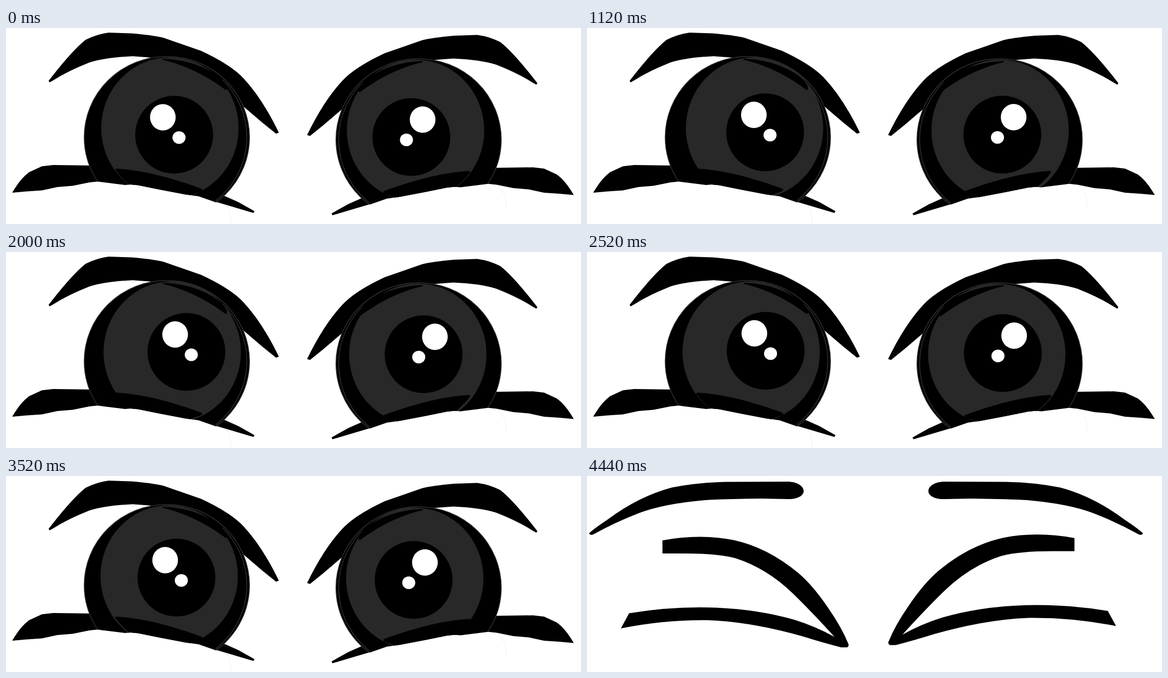
Animation, 1120 px wide and 382 px high, one loop 4640 ms. Source, as an HTML page:

```html
<!DOCTYPE html>
<html lang="en">
<head>
<meta charset="utf-8">
<title>Blinking eyes</title>
<style>
  html, body { margin: 0; width: 100%; height: 100%; overflow: hidden; background: #fff; }
  svg { display: block; width: 100%; height: 100%; }
  .line { fill: none; stroke: #303030; stroke-width: 1.5; }
  .faint { fill: none; stroke: #f0f0f0; }
</style>
</head>
<body>
<svg viewBox="0 0 1120 382">
  <defs>
    <clipPath id="aboveLowerLid">
      <path d="M100 0H520V360L408 339.500L375 328L350 324.500L300 315L258 306.500L243 305L232 306L180 299.500L150 290H100Z"/>
    </clipPath>
    <g id="lids">
      <path d="M83 103L90 94Q130 43 155 23Q177 12 200 9L245 10.500Q290 14.500 308 19.500L380 44.500Q439 72 463 98.500Q499 137 531.500 204L526 206L500 185L459 150L400 90L310 62L280 57.500L247 55Q195 57 163 67Q120 84 92 102L85 106Z"/>
      <path d="M12 321L17 313Q30 292 45 281L70 269.500L92 267L163 268L181 299L162 301L130 307.500L100 310L70 316.500L40 318.500Z"/>
      <path d="M406 338L425 327L452 339L484 357L482 360.500Q440 348 406 338Z"/>
    </g>
    <g id="ball">
      <ellipse cx="313.300" cy="213" rx="161" ry="157.500"/>
      <ellipse class="line" cx="313.300" cy="213" rx="161" ry="157.500"/>
      <path class="line" d="M422 101A157.500 157 0 0 1 408 337"/>
    </g>
    <ellipse id="iris" cx="319.300" cy="195" rx="133.800" ry="138" fill="#282828"/>
    <g id="shadows">
      <path d="M305 62C345 71 390 92 428 121Q431 120 430 117C434 103 380 61 305 60Z"/>
      <path d="M214 274C250 276 300 284 380 313Q385 316 378 319L358 326L300 320L241 306Q224 292 213 277Z"/>
    </g>
    <g id="pupil">
      <circle cx="327.500" cy="208" r="75.800"/>
      <ellipse cx="305.500" cy="174" rx="25" ry="25.700" fill="#fff"/>
      <ellipse cx="337" cy="213.500" rx="12.700" ry="12.300" fill="#fff"/>
    </g>
    <path id="brow" d="M4 112Q10 105 40 85Q100 40 165 22.500Q215 12.500 270 11.500L390 11C410 11 422 20 422 29.500C422 38 410 46 390 45L340 44Q270 44.500 230 47Q150 54 102 72Q55 90 12 114Q6 116 4 112Z"/>
    <path id="shut" d="M147 125.500V151H190Q255 151 290 160.500Q350 180 400 228Q440 267 482 313.500Q445 293 405 280.500Q320 256 220 256Q150 256 82 267.500L66 297Q150 280 235 281Q320 284 420 312.500Q460 325 495 334H507Q511 331 509 327Q496 295 471 259Q441 214 411 188.500Q351 139 286 125Q220 112 147 125.500Z"/>
  </defs>

  <g id="open">
    <path class="faint" d="M428 342Q440 358 438 380M958 309Q978 325 973 352"/>
    <use href="#lids"/>
    <use href="#lids" transform="matrix(-1 0 0 1 1118 4.500)"/>
    <g class="eye"></g>
    <g class="eye" transform="matrix(-1 0 0 1 1117 4.500)"></g>
  </g>
  <g id="closed">
    <use href="#brow"/>
    <use href="#brow" transform="matrix(-1 0 0 1 1087 0)"/>
    <use href="#shut"/>
    <use href="#shut" transform="matrix(-1 0 0 1 1096.500 -4.500)"/>
  </g>
</svg>
<script>
  const LOOP = 4640, STEP = 40, REST = 4160, BLINK = 4440;

  // Gaze offsets in pixels at key times in ms.
  const times  = [0, 680, 1120, 1560, 2040, 2520, 3080, 3520, 3960, 4160];
  const irisX  = [0, 5.5, 7, 6.6, 4.2, 0.5, -2, -1.5, -0.1, 0];
  const pupilX = [0, 13, 19.5, 23.5, 23.8, 20.5, 12, 4.5, 0.3, 0];
  const pupilY = [0, 0, -4.7, -10, -13.5, -15.5, -15, -10, -1.6, 0];

  const slope = (v, i) => i === 0 || i === v.length - 1
    ? 0 : (v[i + 1] - v[i - 1]) / (times[i + 1] - times[i - 1]);

  // Smooth cubic through the keys, at rest at both ends.
  function sample(v, t) {
    let i = 0;
    while (i < times.length - 2 && t >= times[i + 1]) i++;
    const span = times[i + 1] - times[i], u = (t - times[i]) / span, w = 1 - u;
    return v[i] * w * w * (1 + 2 * u) + v[i + 1] * u * u * (3 - 2 * u)
      + span * u * w * (slope(v, i) * w - slope(v, i + 1) * u);
  }

  const eyes = [...document.querySelectorAll('.eye')].map((eye, i) => {
    eye.innerHTML = `<g clip-path="url(#aboveLowerLid)"><use href="#ball"/>
      <use class="iris" href="#iris"/><use href="#shadows"/><use class="pupil" href="#pupil"/></g>`;
    return { side: i ? -1 : 1, iris: eye.querySelector('.iris'), pupil: eye.querySelector('.pupil') };
  });
  const open = document.getElementById('open'), closed = document.getElementById('closed');
  const move = (node, x, y) => node.setAttribute('transform', `translate(${x} ${y})`);

  function draw(now) {
    const time = now % LOOP;
    open.style.display = time < BLINK ? '' : 'none';
    closed.style.display = time < BLINK ? 'none' : '';
    const t = time < 2 * STEP ? 0 : Math.min(REST, Math.floor(time / STEP) * STEP);
    for (const { side, iris, pupil } of eyes) {
      move(iris, side * sample(irisX, t), 0);
      move(pupil, side * sample(pupilX, t), sample(pupilY, t));
    }
  }

  const start = performance.now();
  function tick() {
    draw(performance.now() - start);
    requestAnimationFrame(tick);
  }
  tick();
</script>
</body>
</html>
```
